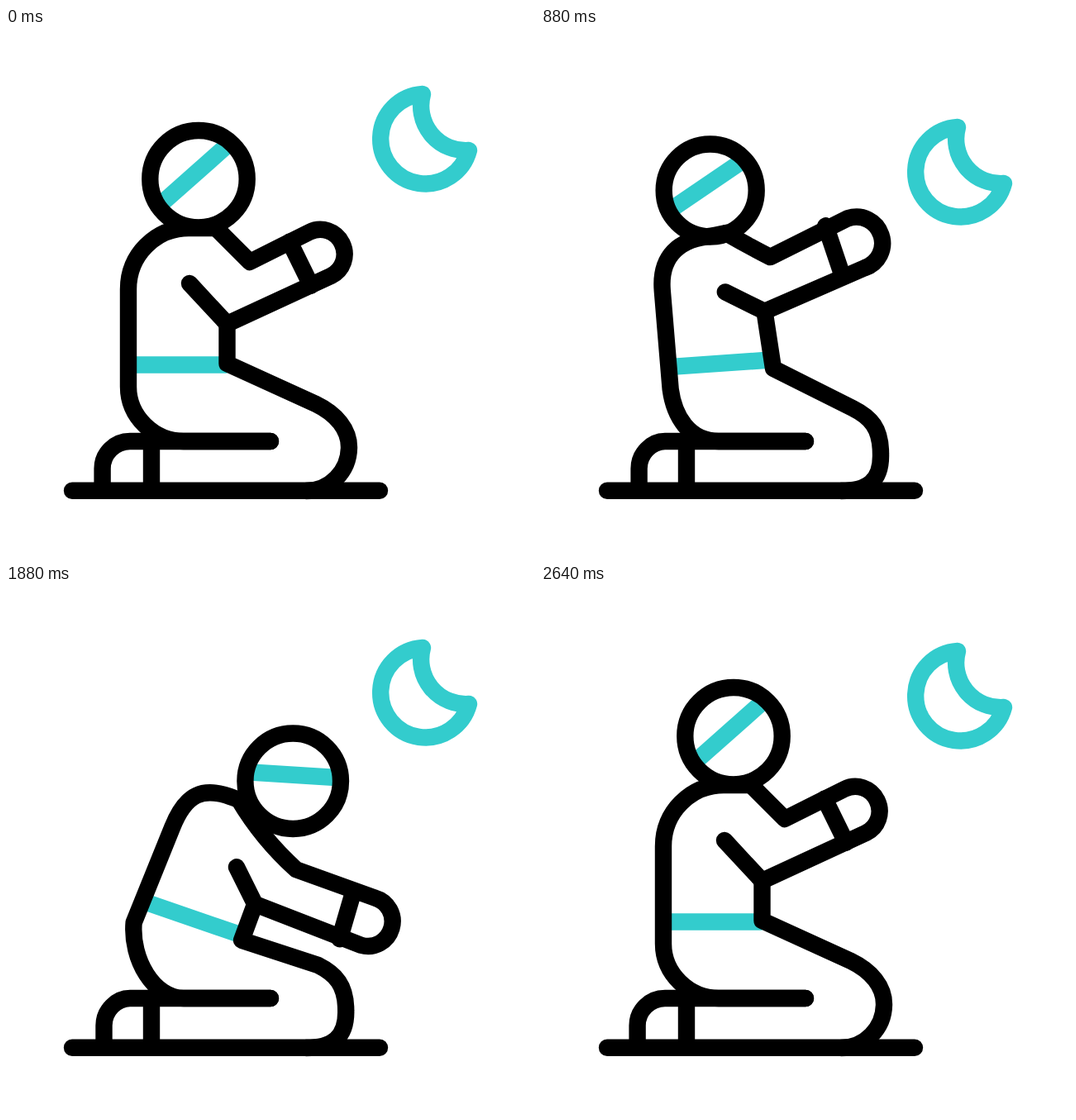
An HTML page that plays this animation: 640 px wide and 640 px high, repeating every 3000 ms.

```html
<!DOCTYPE html>
<html lang="en">
<head>
<meta charset="utf-8">
<title>Kneeling figure and moon</title>
<style>
  html, body { margin: 0; width: 100%; height: 100%; overflow: hidden; background: #fff; }
  svg { display: block; width: 100%; height: 100%; }
  path, circle { fill: none; stroke: #000; stroke-width: 20.4; stroke-linecap: round; stroke-linejoin: round; }
  .teal { stroke: #33cccd; }
  #belt, #stripe { stroke-linecap: butt; }
</style>
</head>
<body>
<svg viewBox="0 0 640 640">
  <path id="moon" class="teal" d="M504 80A54.3 54.3 0 1 0 560 148A54 54 0 0 1 504 80Z"/>
  <path id="belt" class="teal"/>
  <path id="stripe" class="teal"/>
  <path id="back"/>
  <path id="arm"/>
  <path id="wrist"/>
  <path id="leg"/>
  <path id="foot"/>
  <circle id="head"/>
  <path d="M80 559.8H452"/>
</svg>
<script>
const LOOP = 3000, STEP = 40;

// Joint: place at rest, leaning back and bowed; then how far its way arcs
// off the straight line while swinging down and while rising.
const JOINTS = {
  head:     [[233, 182.7], [176.6, 192.9], [353.3, 241.8], [-10, -33], [0, -33]],
  neck:     [[254, 242], [221, 244], [281, 260], [-50, 10], [40, 10]],
  top:      [[221, 242], [201, 250], [280, 259], [-50, 0]],
  side:     [[148, 316], [137, 323], [204, 292], [-10, 0]],
  low:      [[148, 434], [157, 443], [155, 407]],
  hip:      [[148, 470], [163, 473], [151, 452]],
  shoulder: [[222, 309], [211, 318], [282, 343], [0, -20]],
  elbow:    [[295, 283], [262, 263], [354, 347.5]],
  pit:      [[267.5, 358], [264, 334], [303, 387.5]],
  palm:     [[367, 247], [356, 201.5], [448, 385.5], [0, -14], [46, 0]],
  heel:     [[393, 300], [384, 262], [429, 443], [0, -14], [46, 0]],
  front:    [[267.5, 406], [280, 408], [286, 431]]
};
const TILT = [-41.6, 5.8], HEAD_R = 58.7;
const MOON = [[0, 0], [880, 40], [1360, -21.6], [2000, 0], [LOOP, 0]];

const $ = id => document.getElementById(id);
const put = (id, d) => $(id).setAttribute('d', d);
const mix = (a, b, u) => a + (b - a) * u;
const mix2 = (a, b, u) => [mix(a[0], b[0], u), mix(a[1], b[1], u)];
const add = (a, b, k = 1) => [a[0] + b[0] * k, a[1] + b[1] * k];
const turn = ([x, y]) => [y, -x];
const corner = (a, c, b) => `C${mix2(a, c, .56)} ${mix2(b, c, .56)} ${b}`;

function ease(t, from, to) {
  const s = Math.min(1, Math.max(0, (t - from) / (to - from)));
  return s * s * (3 - 2 * s);
}

function moonY(t) {
  const k = MOON.findIndex(m => m[0] > t);
  const [t0, y0] = MOON[k - 1], [t1, y1] = MOON[k];
  return mix(y0, y1, (t - t0) / (t1 - t0));
}

function draw(t) {
  const lean = ease(t, 0, 600), swing = ease(t, 600, 1680), rise = ease(t, 1760, 2640);
  const still = [0, 0];
  const at = name => {
    const [rest, back, bow, down = still, up = still] = JOINTS[name];
    const p = mix2(mix2(mix2(rest, back, lean), bow, swing), rest, rise);
    return add(add(p, down, swing * (1 - swing)), up, rise * (1 - rise));
  };
  const bow = swing * (1 - rise);

  $('moon').setAttribute('transform', `translate(0 ${moonY(t)})`);

  // back: the shoulder curve follows the slope of the side
  const neck = at('neck'), top = at('top'), side = at('side'), low = at('low');
  const slope = add(side, low, -1);
  put('back', `M${neck}L${top}C${add(top, turn(slope), .34)} ${add(side, slope, .35)} ${side}` +
    `L${low}C${at('hip')} 179 500 215 500H320`);

  // arm: the hand is a half circle on the line from palm to heel
  const elbow = at('elbow'), palm = at('palm'), heel = at('heel'), pit = at('pit');
  const reach = turn(add(heel, palm, -1)).map(v => v / 2);
  const tip = add(mix2(palm, heel, .5), reach);
  const bulge = turn(add(neck, elbow, -1)).map(v => -v * .08 * bow);
  const bend = add(mix2(neck, elbow, .5), bulge, -1);
  put('arm', `M${neck}Q${bend} ${elbow}L${palm}${corner(palm, add(palm, reach), tip)}` +
    `${corner(tip, add(heel, reach), heel)}L${pit}L${at('shoulder')}`);
  put('wrist', `M${add(palm, reach, -.9)}L${add(heel, reach, -.9)}`);

  // belt: nearly square to the side
  const front = at('front'), buckle = mix2(side, low, .775);
  const drop = (front[0] - buckle[0]) * -.85 * slope[0] / slope[1];
  put('belt', `M${buckle}L${front[0]} ${buckle[1] + drop}`);

  const k = lean * (1 - rise), m = (a, b) => mix(a, b, k);
  put('leg', `M${pit}L${front}L${m(375, 377)} ${m(455, 460)}` +
    `C${m(400, 399)} ${m(467, 471)} ${m(415, 411)} ${m(486, 484)} ${m(415, 411)} ${m(507, 515)}` +
    `C${m(415, 412)} ${m(536, 548)} ${m(392, 395)} 560 363 560`);
  const x = m(116.6, 118.6);
  put('foot', `M${x} 556V533C${x} 515 ${x + 15} 500 150 500H320M176 500V556`);

  // head: points move on chords, so it shrinks a little halfway through a turn
  const [cx, cy] = at('head');
  const [a, b] = TILT.map(d => [Math.cos(d * Math.PI / 180), Math.sin(d * Math.PI / 180)]);
  const axis = mix2(a, b, bow), r = HEAD_R * Math.hypot(...axis);
  const angle = Math.atan2(axis[1], axis[0]) * 180 / Math.PI;
  for (const [key, v] of Object.entries({ cx, cy, r })) $('head').setAttribute(key, v);
  put('stripe', `M${2 - r} -7.5H${r - 2}`);
  $('stripe').setAttribute('transform', `translate(${cx} ${cy}) rotate(${angle})`);
}

const start = performance.now();
function tick() {
  const t = (performance.now() - start) % LOOP;
  draw(Math.floor(t / STEP) * STEP);
  requestAnimationFrame(tick);
}
tick();
</script>
</body>
</html>
```
